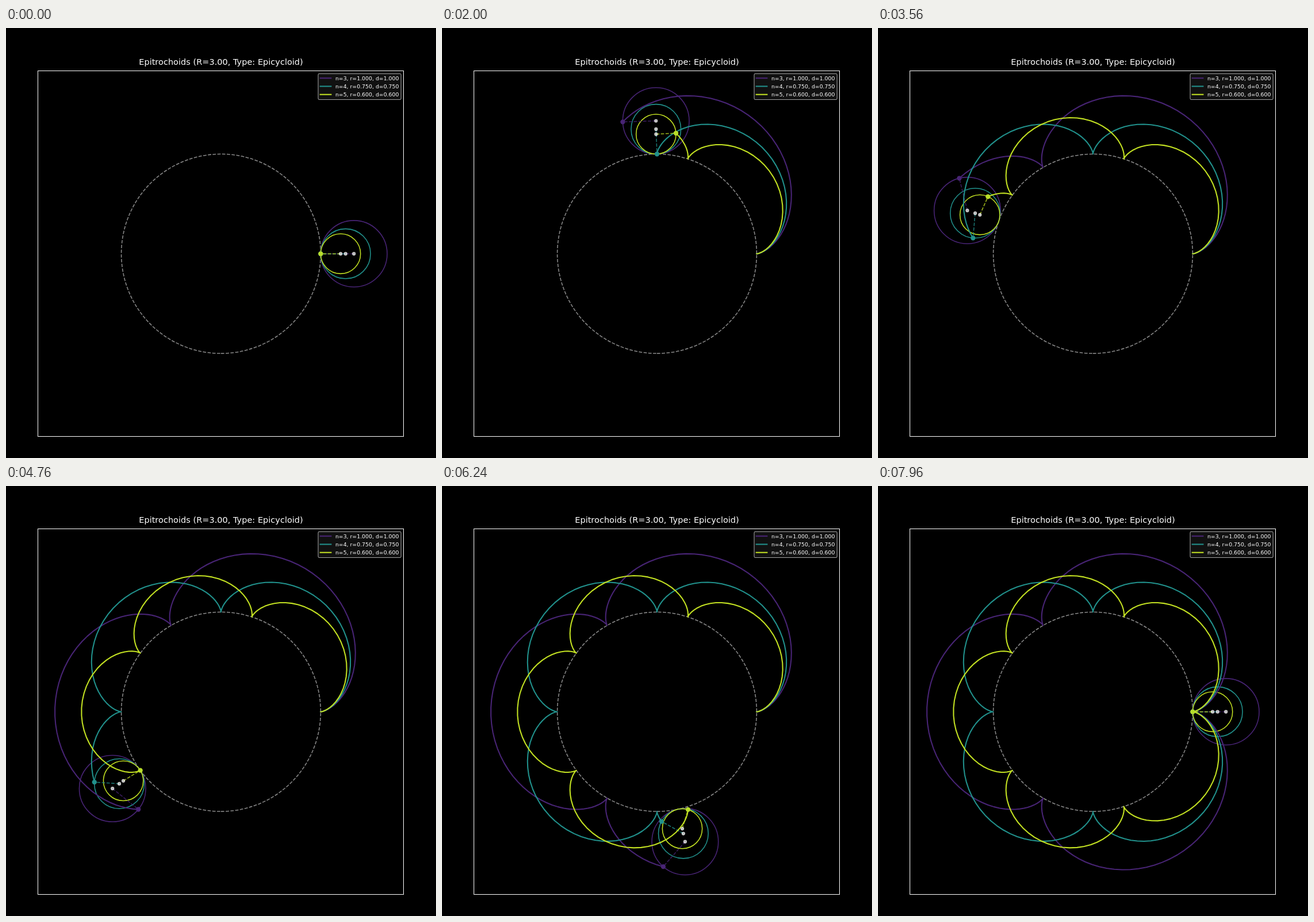
An HTML page for the animation above (8000 ms loop, 748 by 748 pixels).

```html
<!DOCTYPE html>
<html lang="en">
<head>
<meta charset="utf-8">
<title>Epitrochoids</title>
<style>
  html, body { margin: 0; width: 100%; height: 100%; overflow: hidden; background: #000; }
  svg { display: block; width: 748px; height: 748px; }
  text { font-family: "DejaVu Sans", sans-serif; fill: #fff; }
</style>
</head>
<body>
<svg id="stage" viewBox="0 0 748 748" fill="none">
  <rect width="748" height="748" fill="#000"/>
  <g id="wheels"></g>
  <g id="curves"></g>
  <rect x="55.5" y="74.5" width="636" height="636" stroke="#fff"/>
  <text x="374" y="64.4" font-size="14.54" text-anchor="middle">Epitrochoids (R=3.00, Type: Epicycloid)</text>
  <g id="legend">
    <rect x="543" y="79.5" width="144.2" height="45" rx="1.9" fill="#111" stroke="#a3a3a3" stroke-width="1.04"/>
  </g>
</svg>
<script>
const STEPS = 200, STEP_MS = 40;
const CX = 374, CY = 392.7, UNIT = 57.8, PT = 1.039;
const R = 3;
const DASH = `${3.7 * 1.5 * PT} ${1.6 * 1.5 * PT}`;
const SETS = [
  { n: 3, line: "#482475", dot: "#482475" },
  { n: 4, line: "#21918c", dot: "#21918c" },
  { n: 5, line: "#c2e022", dot: "#b8de29" }
];

const byId = id => document.getElementById(id);

function add(parent, tag, attrs) {
  const el = document.createElementNS("http://www.w3.org/2000/svg", tag);
  set(el, attrs);
  parent.appendChild(el);
  return el;
}

function set(el, attrs) {
  for (const key in attrs) el.setAttribute(key, attrs[key]);
}

const toPx = (x, y) => [CX + x * UNIT, CY - y * UNIT];
const angleAt = step => 2 * Math.PI * step / (STEPS - 1);

function centreAt(r, a) {
  return toPx((R + r) * Math.cos(a), (R + r) * Math.sin(a));
}

function pointAt(r, a) {
  const b = (R + r) / r * a;
  return toPx((R + r) * Math.cos(a) - r * Math.cos(b),
              (R + r) * Math.sin(a) - r * Math.sin(b));
}

// Fixed circle, dashed from its lowest point counter-clockwise
const rad = R * UNIT;
add(byId("wheels"), "path", {
  d: `M${CX} ${CY + rad}a${rad} ${rad} 0 0 0 0 ${-2 * rad}a${rad} ${rad} 0 0 0 0 ${2 * rad}`,
  stroke: "#888", "stroke-width": 1.5 * PT, "stroke-dasharray": DASH
});

const rollers = SETS.map(({ n, line, dot }, i) => {
  const r = R / n, curves = byId("curves"), legend = byId("legend");
  const y = 87.2 + i * 14.25, size = r.toFixed(3);
  add(legend, "path", { d: `M546.7 ${y}h18.7`, stroke: line, "stroke-width": 2 * PT, "stroke-linecap": "square" });
  add(legend, "text", { x: 572.9, y: y + 3.4, "font-size": 9.35 })
    .textContent = `n=${n}, r=${size}, d=${size}`;

  const points = Array.from({ length: STEPS }, (_, k) =>
    pointAt(r, angleAt(k)).map(v => v.toFixed(2)).join(","));
  return {
    r, points,
    wheel: add(byId("wheels"), "circle", { r: r * UNIT, stroke: line, "stroke-width": 1.5 * PT }),
    trace: add(curves, "polyline", {
      stroke: line, "stroke-width": 2 * PT, "stroke-linejoin": "round", "stroke-linecap": "square"
    }),
    arm: add(curves, "line", {
      stroke: line, "stroke-width": 1.5 * PT, "stroke-dasharray": DASH, "stroke-opacity": 0.8
    }),
    hub: add(curves, "circle", {
      r: 2.5 * PT, fill: "#fff", "fill-opacity": 0.7,
      stroke: "#fff", "stroke-opacity": 0.7, "stroke-width": PT
    }),
    pen: add(curves, "circle", { r: 4.15, fill: dot })
  };
});

function draw(step) {
  const a = angleAt(step);
  for (const { r, points, wheel, trace, arm, hub, pen } of rollers) {
    const [cx, cy] = centreAt(r, a), [px, py] = pointAt(r, a);
    set(wheel, { cx, cy });
    set(hub, { cx, cy });
    set(pen, { cx: px, cy: py });
    set(arm, { x1: cx, y1: cy, x2: px, y2: py });
    trace.setAttribute("points", points.slice(0, step + 1).join(" "));
  }
}

const start = performance.now();
let shown = -1;
function tick() {
  const step = Math.floor((performance.now() - start) / STEP_MS) % STEPS;
  if (step !== shown) draw(shown = step);
  requestAnimationFrame(tick);
}
tick();
</script>
</body>
</html>
```
